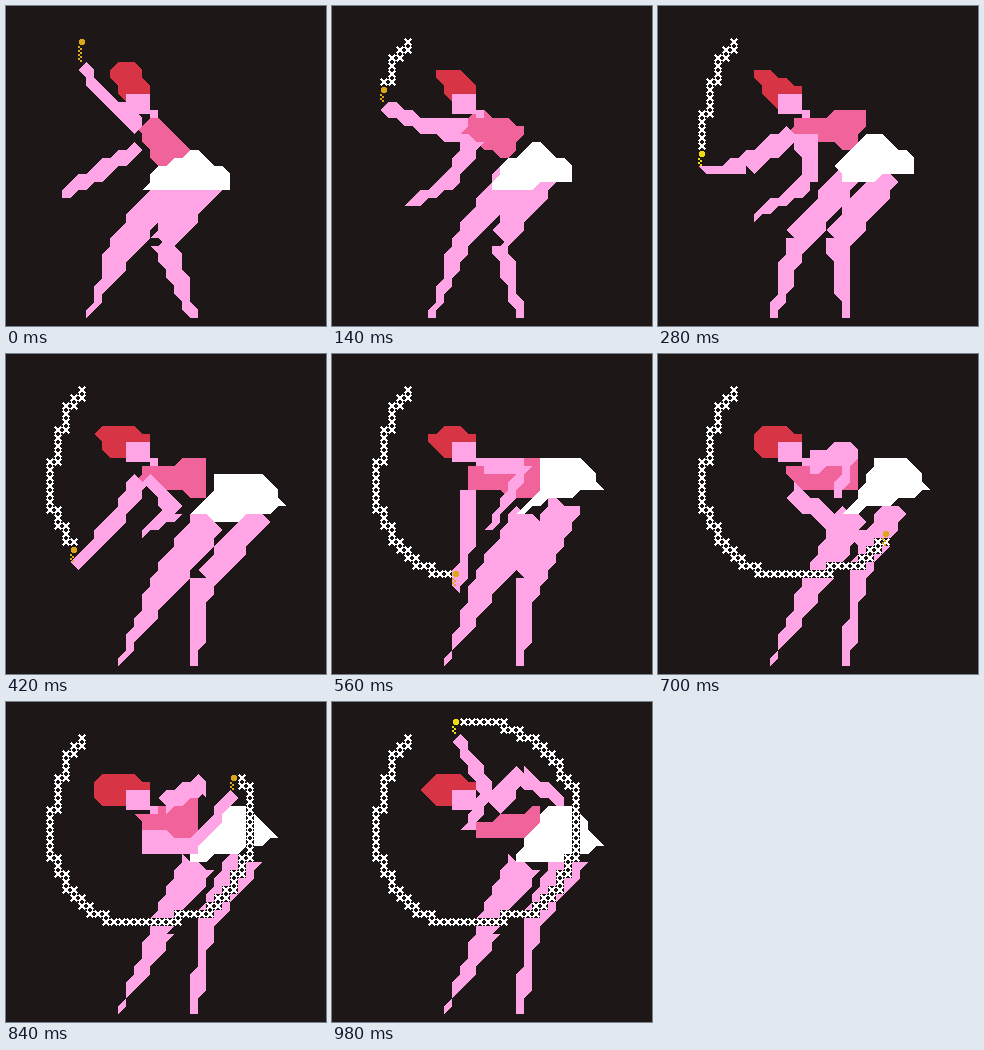
An HTML page that plays this animation: 320x320 px, repeating every 1120 ms.

```html
<!DOCTYPE html>
<html lang="en">
<head>
<meta charset="utf-8">
<title>Ribbon dancer</title>
<style>
html, body { margin: 0; width: 100%; height: 100%; overflow: hidden; background: #1d1717; }
svg { display: block; width: 100%; height: 100%; }
</style>
</head>
<body>
<svg id="stage" viewBox="0 0 40 40" shape-rendering="crispEdges"></svg>
<script>
// All lengths are in cells of 8px.
const STEP = 140, BG = '#1d1717', SKIN = '#ffa5e5';
const WIDTHS = { body: [3, 4.6], arm: [2.2, 2, 1], leg: [3.8, 2.7, 1] };

const points = text => text.split(' ').map(pair => pair.split(',').map(Number));
const lerp = (a, b, t) => a + (b - a) * t;

// The ribbon fills every cell that the wand's sweep passes through
function sweep(d) {
  const curve = document.createElementNS('http://www.w3.org/2000/svg', 'path');
  curve.setAttribute('d', d);
  const cells = new Map();
  for (let s = 0; s < curve.getTotalLength(); s += .05) {
    const p = curve.getPointAtLength(s), cell = [Math.round(p.x), Math.round(p.y)];
    cells.set(cell.join(), cell);
  }
  return [...cells.values()];
}
const ribbon = sweep('M9,4 7.5,6 6.5,9 5.5,13 5,16 5.5,19 7.5,23 8.5,24 10,25.5 12,26.5 17,27.2 ' +
  '21,26.5 25,25.5 27,23.5 28.5,21 29.5,19 30.2,15 29.5,10 28.5,9 27.5,7 25,4.5 23,3.5 21,2.5 20,2 14.8,2');
const along = (x, y) => ribbon.findIndex(c => c[0] === x && c[1] === y);

// Key poses: joints of limbs and corners of hair and skirt; the wand hand follows the ribbon
const keys = [
  { tip: along(9, 4), stick: 2, hair: '14,11 13,9 13,8 14,7 16,7',
    body: '17.5,14.5 21,19', skirt: '23,18 24,18 28,21 28,23 17,23 19,20',
    wandArm: '16.5,15 11.5,10.5', arm: '16.5,17.5 12.5,20 7,23.5',
    legs: ['20.5,22 14.5,30 10,39', '25,21.5 19.5,29.5 23.5,39'] },
  { tip: along(5, 18), bright: true, hair: '13,11 12,9 12,8 14,8 16,9',
    body: '16.5,15 25.5,15.5', skirt: '26,16 28,16 32,19 32,21 23,22 22,20',
    wandArm: '16.5,16 11,20', arm: '18.5,15.5 18.5,22 12,26.5',
    legs: ['24,21 17.5,29 14.3,39', '28.5,21 22.5,29 23.7,39'] },
  { tip: along(8, 24), hair: '13,13 12,12 11,10 12,9 16,9',
    body: '16.5,15 25,15.5', skirt: '26,15 32,15 35,19 28,21 23,20 26,17',
    wandArm: '17,15.5 13.5,21', arm: '17.5,15.5 21,19.5 17,22.5',
    legs: ['25.5,20.5 19.5,29 14,39', '32,19.5 24.7,28 23.5,39'] },
  { tip: along(15, 27), hair: '14,13 12,11 12,10 14,9 16,9',
    body: '16.5,15.5 26,15.5', skirt: '26,13 31,13 34,17 27,18 23,20 26,17',
    wandArm: '17,17 17,23', arm: '18.5,14 24,14 19.5,22',
    legs: ['25,20 19.5,28 14,39', '29,18.5 24.7,28 23.5,39'] },
  { tip: along(28, 9), hair: '12,13 11,12 11,10 12,9 16,9',
    body: '16.5,15 24,14.7', skirt: '27,13 30,13 34,17 28,19 23,20 23,19',
    wandArm: '16.5,17.5 23.5,17.5', arm: '19.8,13 24.5,10 25,13.5',
    legs: ['24,20 19.3,28.5 14,39', '30,19 25,27 23.5,39'] },
  { tip: along(15, 2), bright: true, hair: '13,13 11,11 12,10 13,9 16,9',
    body: '18,16 26,15', skirt: '27,13 30,13 34,18 28,20 23,20 23,19',
    wandArm: '17,16 19.5,11', arm: '20,13 23.5,9 29,12.5',
    legs: ['24,20 19.3,28.5 14,39', '30,19 25,27 23.5,39'] }
].map(({ tip, stick = 1, bright, legs, ...parts }) => ({
  tip, stick, bright, legs: legs.map(points),
  ...Object.fromEntries(Object.entries(parts).map(([name, text]) => [name, points(text)]))
}));

function between(a, b) {
  if (Array.isArray(a)) return a.map((v, i) => between(v, b[i]));
  return lerp(a, b, .5);
}
function inBetween(a, b) {
  const pose = { stick: 1, tip: Math.round(between(a.tip, b.tip)) };
  for (const part of ['hair', 'body', 'skirt', 'wandArm', 'arm', 'legs']) pose[part] = between(a[part], b[part]);
  return pose;
}

// Outline on the cell grid, built only from straight and diagonal steps
function blocky(corners) {
  const grid = corners.map(p => p.map(Math.round));
  const steps = grid.flatMap(([x, y], i) => {
    const [u, v] = grid[(i + 1) % grid.length];
    const n = Math.max(Math.abs(u - x), Math.abs(v - y));
    return Array.from({ length: n }, (_, k) => [Math.round(lerp(x, u, k / n)), Math.round(lerp(y, v, k / n))]);
  });
  return steps.length ? 'M' + steps.join(' ') + 'z' : '';
}

const fill = (d, color) => `<path d="${d}" fill="${color}"/>`;

function limb(joints, widths, color = SKIN) {
  return joints.slice(1).map(([u, v], i) => {
    const [x, y] = joints[i], length = Math.hypot(u - x, v - y);
    const nx = (y - v) / length / 2, ny = (u - x) / length / 2;
    const a = widths[i], b = widths[i + 1];
    return fill(blocky([[x + nx * a, y + ny * a], [u + nx * b, v + ny * b],
      [u - nx * b, v - ny * b], [x - nx * a, y - ny * a]]), color);
  }).join('');
}

function wand([x, y], stick, color) {
  let d = '';
  for (let i = 0; i < stick * 4; i++) d += `M${x + i % 2 / 4},${y + 1 + i / 4}h.25v.25h-.25z`;
  return fill(d, color) + `<circle cx="${x + .5}" cy="${y + .5}" r=".4" fill="${color}"/>`;
}

function trail(cells) {
  const blocks = cells.map(([x, y]) => `M${x},${y}h1v1h-1z`).join('');
  const crosses = cells.map(([x, y]) => `M${x + .1},${y + .1}l.8,.8m0,-.8l-.8,.8`).join('');
  return fill(blocks, BG) + `<path d="${crosses}" fill="none" stroke="#fff" stroke-width=".25"/>`;
}

function picture({ tip, stick, bright, hair, body, skirt, wandArm, arm, legs }) {
  const [x, y] = ribbon[tip], hand = [x + .5, y + stick + 1.4];
  return limb(body, WIDTHS.body, '#f0649b') +
    legs.map(leg => limb(leg, WIDTHS.leg)).join('') +
    fill(blocky(skirt), '#fff') +
    limb(arm, WIDTHS.arm) + limb([...wandArm, hand], WIDTHS.arm) +
    fill('M15,11h3v2h1v1h-1v-.5h-3z', SKIN) +
    fill(blocky([...hair, [18, 10], [18, 11], [15, 11], [15, 13]]), '#d73445') +
    trail(ribbon.slice(0, tip)) + wand([x, y], stick, bright ? '#f2da10' : '#dba618');
}

const [reach, low, stoop, under, lift, arch] = keys;
const pictures = [reach, inBetween(reach, low), low, stoop, under, inBetween(under, lift), lift, arch].map(picture);
const stage = document.getElementById('stage');
let shown = -1;
function draw() {
  const now = Math.floor(performance.now() / STEP) % pictures.length;
  if (now !== shown) stage.innerHTML = pictures[shown = now];
  requestAnimationFrame(draw);
}
draw();
</script>
</body>
</html>
```
